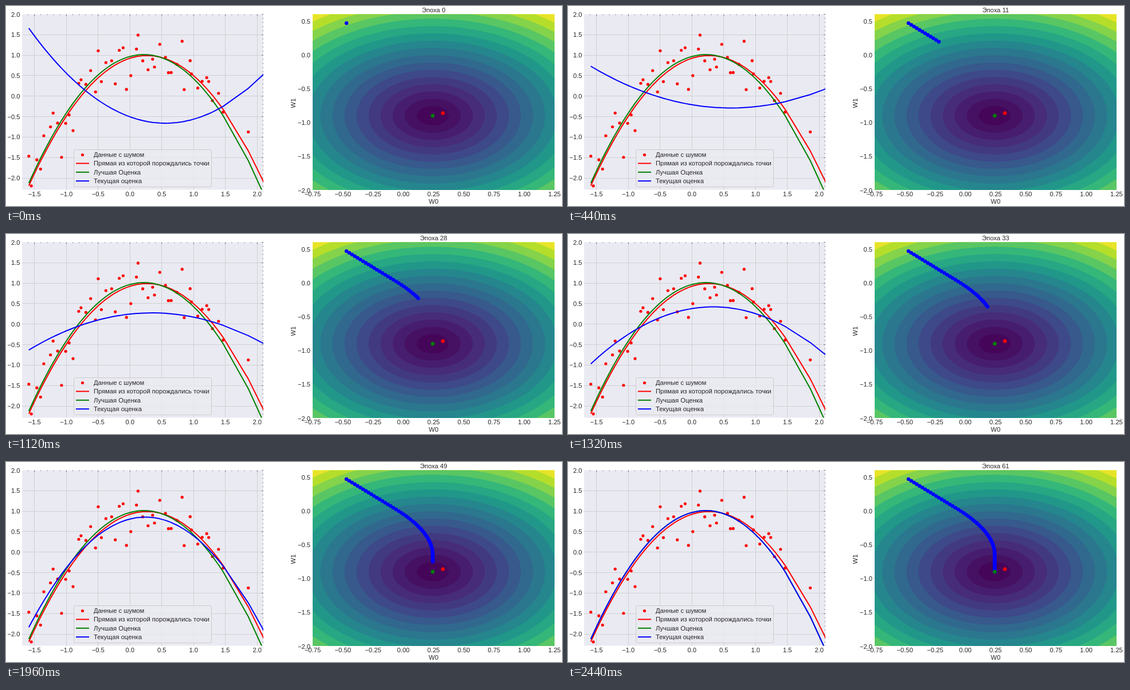
An HTML page with a canvas that plays this animation: 970x350 px, repeating every 2.48 s.

```html
<!DOCTYPE html>
<html lang="ru">
<head>
<meta charset="utf-8">
<style>
  html, body { margin: 0; width: 970px; height: 350px; overflow: hidden; background: #fff; }
  canvas { display: block; }
</style>
</head>
<body>
<canvas id="stage" width="970" height="350"></canvas>
<script>
const ctx = document.getElementById('stage').getContext('2d');
const STEP = 40, EPOCHS = 62, TEXT = '#262626';

// Left plot: data space to pixels
const LEFT = { x: 28, y: 14.5, w: 421, h: 307 };
const px = x => 216.3 + 111 * x;
const py = y => 157.8 - 71.65 * y;

// Right plot: weight space to pixels
const RIGHT = { x: 535, y: 14.5, w: 422, h: 307.5 };
const wx = w => 693.2 + 211 * w;
const wy = w => 85.7 - 118.4 * w;

// Weights are [W0, W1, bias]; the plotted parabola uses decorrelated features
const start = [-0.47, 0.47, -0.504];
const truth = [0.327, -0.86, 0.926];
const best = [0.243, -0.898, 0.97];
const predict = ([w0, w1, bias], x) => 1.07 * w1 * x * x + (w0 - 0.195 * w1) * x + bias;

// Noisy samples around the true parabola
let seed = 11;
const random = () => (seed = seed * 16807 % 2147483647) / 2147483647;
const noise = () => 0.7 * (random() + random() + random() - 1.5);
const sampleX = Array.from({ length: 48 }, (_, i) => -1.59 + i * 0.0645 + (i && 0.05 * (random() - 0.5)));
sampleX.push(1.86);
const points = sampleX.map(x => [x, predict(truth, x) + noise()]);
const curveX = [...sampleX, 2.105];

// Steady progress up to epoch a, then an even slowdown to a stop at epoch b
function brake(epoch, a, b) {
  const late = Math.min(Math.max(epoch - a, 0), b - a);
  return (Math.min(epoch, b) - late * late / (2 * (b - a))) * 2 / (a + b);
}

function weightsAt(epoch) {
  const slow = brake(epoch, 49, 61), fast = brake(epoch, 17.5, 45);
  return start.map((v, c) => v + (best[c] - v) * (c ? slow : fast));
}
const path = Array.from({ length: EPOCHS }, (_, e) => weightsAt(e));

function viridis(v) {
  const stops = ['440154', '482878', '3e4989', '31688e', '26828e',
    '1f9e89', '35b779', '6ece58', 'b5de2b', 'fde725'];
  const p = Math.min(v, 1) * 9, i = Math.min(8, Math.floor(p));
  const channel = (hex, c) => parseInt(hex.slice(c * 2, c * 2 + 2), 16);
  const mix = c => channel(stops[i], c) + (channel(stops[i + 1], c) - channel(stops[i], c)) * (p - i);
  return `rgb(${[0, 1, 2].map(c => Math.round(mix(c))).join()})`;
}

function label(text, x, y, align = 'center') {
  ctx.font = '11.2px "Liberation Sans", Arial, sans-serif';
  ctx.fillStyle = TEXT;
  ctx.textAlign = align;
  ctx.fillText(text, x, y);
}

function dot(x, y, r, color) {
  ctx.fillStyle = color;
  ctx.beginPath();
  ctx.arc(x, y, r, 0, 7);
  ctx.fill();
}

function line(coords, color, width) {
  ctx.strokeStyle = color;
  ctx.lineWidth = width;
  ctx.beginPath();
  coords.forEach(([x, y]) => ctx.lineTo(x, y));
  ctx.stroke();
}

function clipped(box, draw) {
  ctx.save();
  ctx.beginPath();
  ctx.rect(box.x, box.y, box.w, box.h);
  ctx.clip();
  draw();
  ctx.restore();
}

const curve = (weights, color) =>
  line(curveX.map(x => [px(x), py(predict(weights, x))]), color, 2);

const weightDot = (w, color) => dot(wx(w[0]), wy(w[1]), 3.3, color);

const num = (v, digits) => v.toFixed(digits).replace('-', '\u2212');

function drawGrid() {
  ctx.fillStyle = '#eaeaf2';
  ctx.fillRect(LEFT.x, LEFT.y, LEFT.w, LEFT.h);
  for (let v = -2; v <= 2; v += 0.5) {
    const x = Math.floor(px(v)) + 0.5, y = Math.floor(py(v)) + 0.5;
    if (v > -2) {
      line([[x, LEFT.y], [x, LEFT.y + LEFT.h]], '#c9c9cd', 0.8);
      label(num(v, 1), px(v), 333);
    }
    if (v < 2) line([[LEFT.x, y], [LEFT.x + LEFT.w, y]], '#c9c9cd', 0.8);
    label(num(v, 1), 24.5, py(v) + 4, 'right');
  }
  for (let k = -22; k <= 20; k++) {
    const x = px(k / 10), y = py(k / 10);
    if (x > LEFT.x) line([[x, 14.5], [x, k % 5 ? 16 : 17.5]], '#55555c', 0.8);
    line([[k % 5 ? 447.5 : 446, y], [449, y]], '#55555c', 0.8);
  }
}

function drawLegend() {
  ctx.beginPath();
  ctx.roundRect(118.5, 251.5, 240, 65, 2);
  ctx.fillStyle = 'rgba(234,234,242,.8)';
  ctx.fill();
  ctx.strokeStyle = '#ccc';
  ctx.lineWidth = 1;
  ctx.stroke();
  const rows = [['Данные с шумом', 'red'], ['Прямая из которой порождались точки', 'red'],
    ['Лучшая Оценка', 'green'], ['Текущая оценка', 'blue']];
  rows.forEach(([text, color], i) => {
    const y = 260 + 15.4 * i;
    if (i) line([[122, y], [145, y]], color, 2);
    else dot(133.5, y + 0.5, 2.6, color);
    label(text, 153, y + 4, 'left');
  });
}

// Evenly spaced elliptic bands, coloured by the loss at their middle
function drawContours() {
  for (let r = 385; r >= 28; r -= 21) {
    ctx.fillStyle = viridis(0.98 * ((r - 10.5) / 357) ** 1.38);
    ctx.beginPath();
    ctx.ellipse(wx(best[0]), wy(best[1]), r, r / 1.65, 0, 0, 7);
    ctx.fill();
  }
}

function drawRightLabels() {
  for (let v = -0.75; v <= 1.25; v += 0.25) label(num(v, 2), wx(v), 333);
  for (let v = -2; v <= 0.5; v += 0.5) label(num(v, 1), 531, wy(v) + 4, 'right');
  label('W0', 746, 346);
  ctx.save();
  ctx.translate(505, 170);
  ctx.rotate(-Math.PI / 2);
  label('W1', 0, 0);
  ctx.restore();
}

function draw(epoch) {
  ctx.fillStyle = '#fff';
  ctx.fillRect(0, 0, 970, 350);
  ctx.lineJoin = 'round';

  drawGrid();
  clipped(LEFT, () => {
    points.forEach(([x, y]) => dot(px(x), py(y), 2.6, 'red'));
    curve(truth, 'red');
    curve(best, 'green');
    curve(path[epoch], 'blue');
  });
  drawLegend();

  clipped(RIGHT, drawContours);
  drawRightLabels();
  label('Эпоха ' + epoch, 746, 10.5);
  path.slice(0, epoch + 1).forEach(w => weightDot(w, 'blue'));
  weightDot(truth, 'red');
  weightDot(best, 'green');
}

function tick() {
  draw(Math.floor(performance.now() / STEP) % EPOCHS);
  requestAnimationFrame(tick);
}
tick();
</script>
</body>
</html>
```
